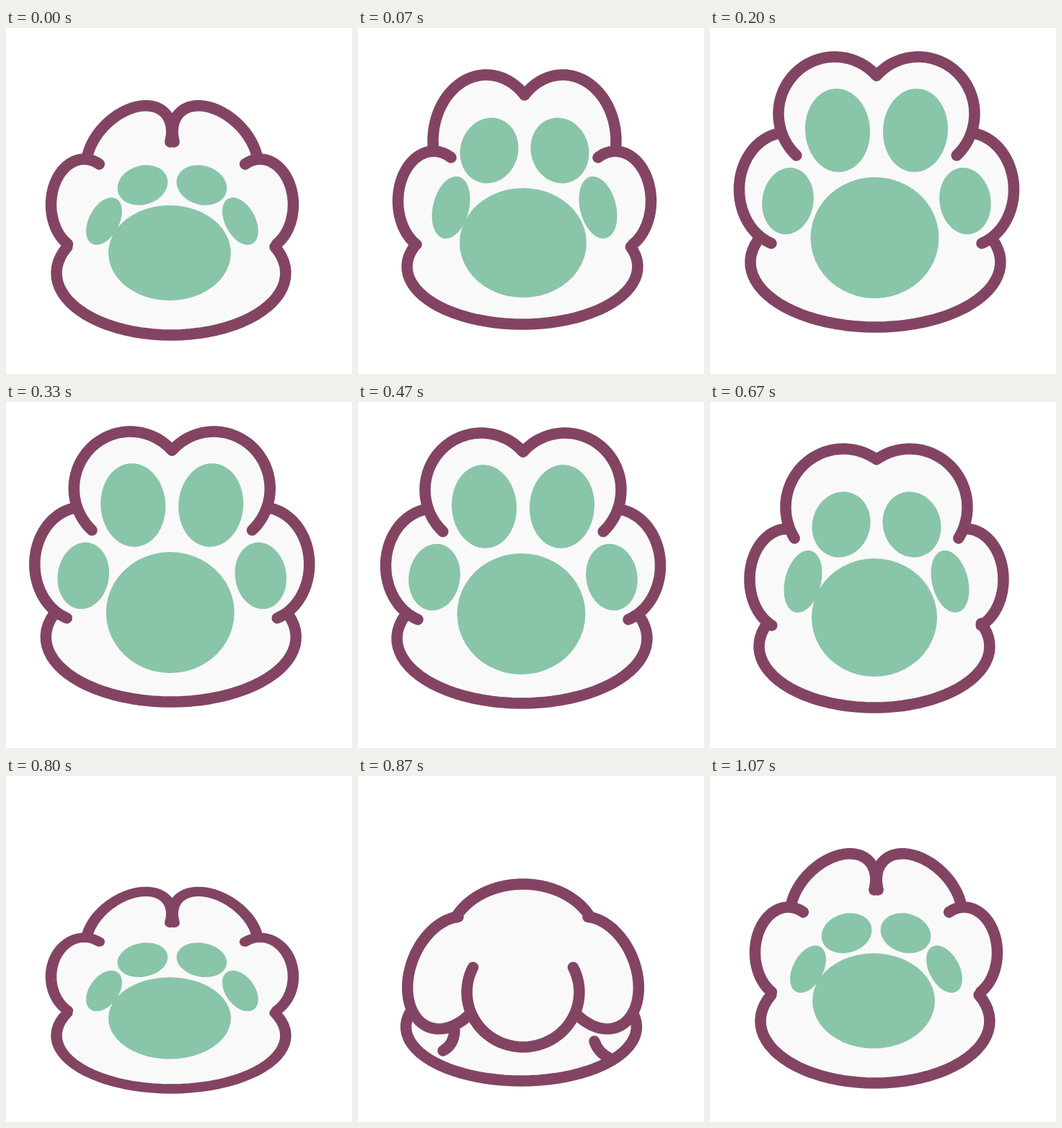
An HTML page that plays this animation: 480 by 480 pixels, repeating every 1.19 s.

```html
<!DOCTYPE html>
<html lang="en">
<head>
<meta charset="utf-8">
<title>Paw</title>
<style>
  html, body { margin: 0; width: 100%; height: 100%; overflow: hidden; background: #fff; }
  svg { display: block; width: 100vw; height: 100vh; }
  .line { fill: none; stroke: #834463; stroke-width: 15.5; stroke-linecap: round; stroke-linejoin: round; }
</style>
</head>
<body>
<svg viewBox="0 0 480 480">
  <g id="paw">
    <path id="skin" fill="#f9f9f9"/>
    <path id="pads" fill="#89c5a9"/>
    <path id="outline" class="line"/>
    <path id="knuckle" class="line"/>
  </g>
</svg>
<script>
// Every shape is an elliptical arc: [cx, cy, rx, ry, tilt, from, to], cx measured
// from the paw's axis. Toes and their pads are mirrored to the left side.
const rest = {
  center: [230.5, 0],
  inner: [60, 167, 70, 46, 45, -228, -45],
  outer: [122, 245, 46, 63, 0, -117, 60],
  base: [-1.5, 340, 159, 86, 0, -25, 205],
  heel: [-3.5, 312, 85, 66, 0, 0, 360],
  innerPad: [41, 218, 35.5, 27, 17, 0, 360],
  outerPad: [94.5, 268, 21, 35.5, -28, 0, 360]
};
const opening = {
  center: [231, 0],
  inner: [53, 157, 74, 92, 0, -136, 8],
  outer: [126, 240, 49.5, 69, 0, -119, 61],
  base: [-3, 331, 160, 80, 0, -20, 200],
  heel: [-2, 298, 88, 76, 0, 0, 360],
  innerPad: [49, 170, 40, 46, -17, 0, 360],
  outerPad: [102, 249, 25, 44, -14, 0, 360]
};
const spread = {
  center: [231, 0],
  inner: [58, 119, 78, 79, 0, -138, 47],
  outer: [124.5, 224, 66, 79, 0, -80, 71],
  base: [-1.5, 325, 173.5, 90, 0, -20, 200],
  heel: [-2.5, 291, 89, 84, 0, 0, 360],
  innerPad: [54, 142, 45, 58, 4, 0, 360],
  outerPad: [123, 240, 35.5, 46.5, -9, 0, 360]
};
const lean = { ...spread, center: [229, 3] };
const closing = {
  ...opening,
  inner: [46, 146, 80, 81, 0, -125, 32],
  outer: [124, 246, 52, 70, 0, -90, 66],
  base: [-3, 339, 160, 85, 0, -22, 202],
  heel: [-3, 299, 87, 82, 0, 0, 360]
};
const fist = {
  center: [229, 0],
  inner: [0, 230, 103, 80, 0, -90, -25],
  outer: [101, 273, 55, 81, -22, -70, 146],
  base: [-2.5, 348, 160, 75, 0, -15, 195],
  knuckle: [0, 300, 78, 76, 0, -27, 207]
};
const thumbs = 'M134 353Q133 373 118 381M328 368Q333 384 350 392';

const mix = (a, b, t) => typeof a === 'number' ? a + (b - a) * t
  : Array.isArray(a) ? a.map((v, i) => mix(v, b[i], t))
  : Object.fromEntries(Object.keys(a).map(key => [key, mix(a[key], b[key], t)]));

// Start time in ms, pose, and vertical stretch about the base line.
const steps = [
  [0, rest], [70, opening], [130, mix(opening, spread, .6)], [200, spread],
  [330, mix(spread, lean, .35)], [400, mix(spread, lean, .7)], [470, lean],
  [530, mix(spread, lean, .5)], [600, mix(lean, closing, .5)], [670, closing],
  [730, rest], [800, { ...rest, center: [230.5, 8] }, .86], [870, fist],
  [1000, fist, 1.06], [1070, rest]
];
const LOOP = 1190;
const BASE_LINE = 426;

function arc([cx, cy, rx, ry, tilt, from, to]) {
  const rad = Math.PI / 180, segments = 48;
  const cos = Math.cos(tilt * rad), sin = Math.sin(tilt * rad);
  return Array.from({ length: segments + 1 }, (_, i) => {
    const angle = (from + (to - from) * i / segments) * rad;
    const x = rx * Math.cos(angle), y = ry * Math.sin(angle);
    return [cx + x * cos - y * sin, cy + x * sin + y * cos];
  });
}

const mirror = points => points.map(([x, y]) => [-x, y]).reverse();

const [paw, skin, pads, outline, knuckle] =
  ['paw', 'skin', 'pads', 'outline', 'knuckle'].map(id => document.getElementById(id));

function draw(time) {
  const [, pose, stretch = 1] = steps.findLast(step => step[0] <= time);
  const [axis, drop] = pose.center;
  const trace = points => points.map(([x, y]) => `${(axis + x).toFixed(2)} ${y.toFixed(2)}`).join('L');
  const lines = shapes => shapes.map(points => 'M' + trace(points)).join('');

  const inner = arc(pose.inner), outer = arc(pose.outer);
  const lobes = [inner, outer, arc(pose.base), mirror(outer), mirror(inner)];
  skin.setAttribute('d', 'M' + lobes.map(trace).join('L') + 'Z');
  outline.setAttribute('d', lines(lobes));

  const toePads = pose.heel ? [arc(pose.innerPad), arc(pose.outerPad)] : [];
  const allPads = pose.heel ? [arc(pose.heel), ...toePads, ...toePads.map(mirror)] : [];
  pads.setAttribute('d', allPads.map(points => `M${trace(points)}Z`).join(''));
  knuckle.setAttribute('d', pose.knuckle ? lines([arc(pose.knuckle)]) + thumbs : '');
  paw.setAttribute('transform',
    `translate(0 ${drop + BASE_LINE * (1 - stretch)}) scale(1 ${stretch})`);
}

const start = performance.now();
function tick() {
  draw((performance.now() - start) % LOOP);
  requestAnimationFrame(tick);
}
tick();
</script>
</body>
</html>
```
